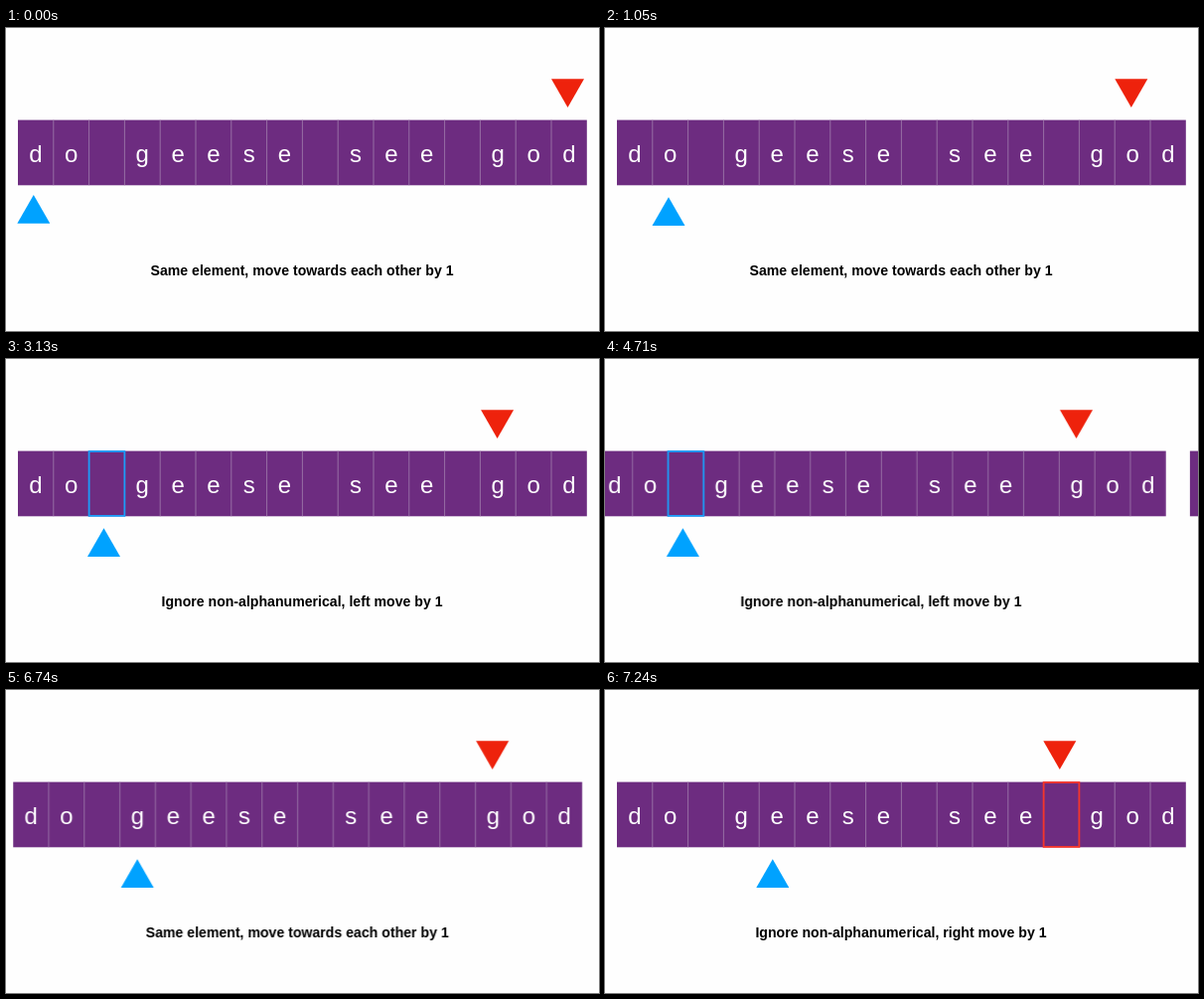
Write an HTML page that moves like this. It is 597 px wide and 305 px high and loops after 8 s.

```html
<!DOCTYPE html>
<html lang="en">
<head>
<meta charset="utf-8">
<title>Two pointers on a palindrome</title>
<style>
  html, body { margin: 0; width: 100%; height: 100%; overflow: hidden; background: #fefefe; }
  svg { display: block; width: 100%; height: 100%; }
  text { text-anchor: middle; font-family: "Liberation Sans", Arial, sans-serif; }
  .letter { font-size: 24px; fill: #fff; }
  .caption { font-size: 14.12px; font-weight: bold; fill: #000; }
  .bar { fill: #6d2c80; }
  .rule { stroke: #a381ae; stroke-width: .8; fill: none; }
  .left { fill: #00a2ff; }
  .right { fill: #ee220c; }
  .mark { fill: none; stroke-width: 1.8; }
  .mark.left { fill: none; stroke: #1b9cf8; }
  .mark.right { fill: none; stroke: #f5352a; }

  /* Each push starts with a small jump, then eases to the next slide. */
  #strip { animation: push 8s linear infinite; }
  @keyframes push {
    0%, 6.249% { transform: translateX(0); }
    6.25% { transform: translateX(-3px); animation-timing-function: cubic-bezier(.36, .08, .63, 1); }
    13.125%, 32.249% { transform: translateX(-597px); }
    32.25% { transform: translateX(-598px); animation-timing-function: cubic-bezier(.37, .05, .63, 1); }
    39.125%, 58.874% { transform: translateX(-1194px); }
    58.875% { transform: translateX(-1213.6px); animation-timing-function: cubic-bezier(.35, .18, .63, 1); }
    65.25%, 84.249% { transform: translateX(-1791px); }
    84.25% { transform: translateX(-1795.5px); animation-timing-function: cubic-bezier(.36, .09, .63, 1); }
    90.5%, 100% { transform: translateX(-2388px); }
  }
</style>
</head>
<body>
<svg viewBox="0 0 597 305" preserveAspectRatio="none"><g id="strip"></g></svg>
<script>
  const STAGE = 597, X = 12, TOP = 92.6, HEIGHT = 65.7, CELL = 35.8;
  const phrase = [..."do geese see god"];
  const same = "Same element, move towards each other by 1";
  const ignore = side => `Ignore non-alphanumerical, ${side} move by 1`;

  const slides = [
    { left: 27.8, right: 565.5, leftTop: 168, caption: same },
    { left: 64, right: 529.8, caption: same },
    { left: 98.5, right: 494.6, caption: ignore("left"), mark: ["left", 2] },
    { left: 137, right: 494.5, caption: same },
    { left: 168.8, right: 457.8, caption: ignore("right"), mark: ["right", 12] }
  ];

  const cellX = i => X + i * CELL;

  const array = () => {
    const rules = phrase.map((_, i) => i ? `M${cellX(i)} ${TOP}v${HEIGHT}` : "").join("");
    const letters = phrase.map((c, i) =>
      c === " " ? "" : `<text class="letter" x="${cellX(i + .5)}" y="135">${c}</text>`).join("");
    return `<rect class="bar" x="${X}" y="${TOP}" width="${CELL * phrase.length}" height="${HEIGHT}"/>
      <path class="rule" d="${rules}"/>${letters}`;
  };

  const pointer = (side, x, tip, dy) =>
    `<path class="${side}" d="M${x} ${tip}l16.5 ${dy}h-33z"/>`;

  const highlight = ([side, i]) =>
    `<rect class="mark ${side}" x="${cellX(i)}" y="${TOP + .4}" width="${CELL}" height="${HEIGHT - .8}"/>`;

  const slide = ({ left, right, leftTop = 170.2, caption, mark }, i) =>
    `<g transform="translate(${i * STAGE})">
      ${array()}
      ${mark ? highlight(mark) : ""}
      ${pointer("right", right, 80, -28.8)}
      ${pointer("left", left, leftTop, 28.8)}
      <text class="caption" x="298" y="249">${caption}</text>
    </g>`;

  document.getElementById("strip").innerHTML = slides.map(slide).join("");
</script>
</body>
</html>
```
